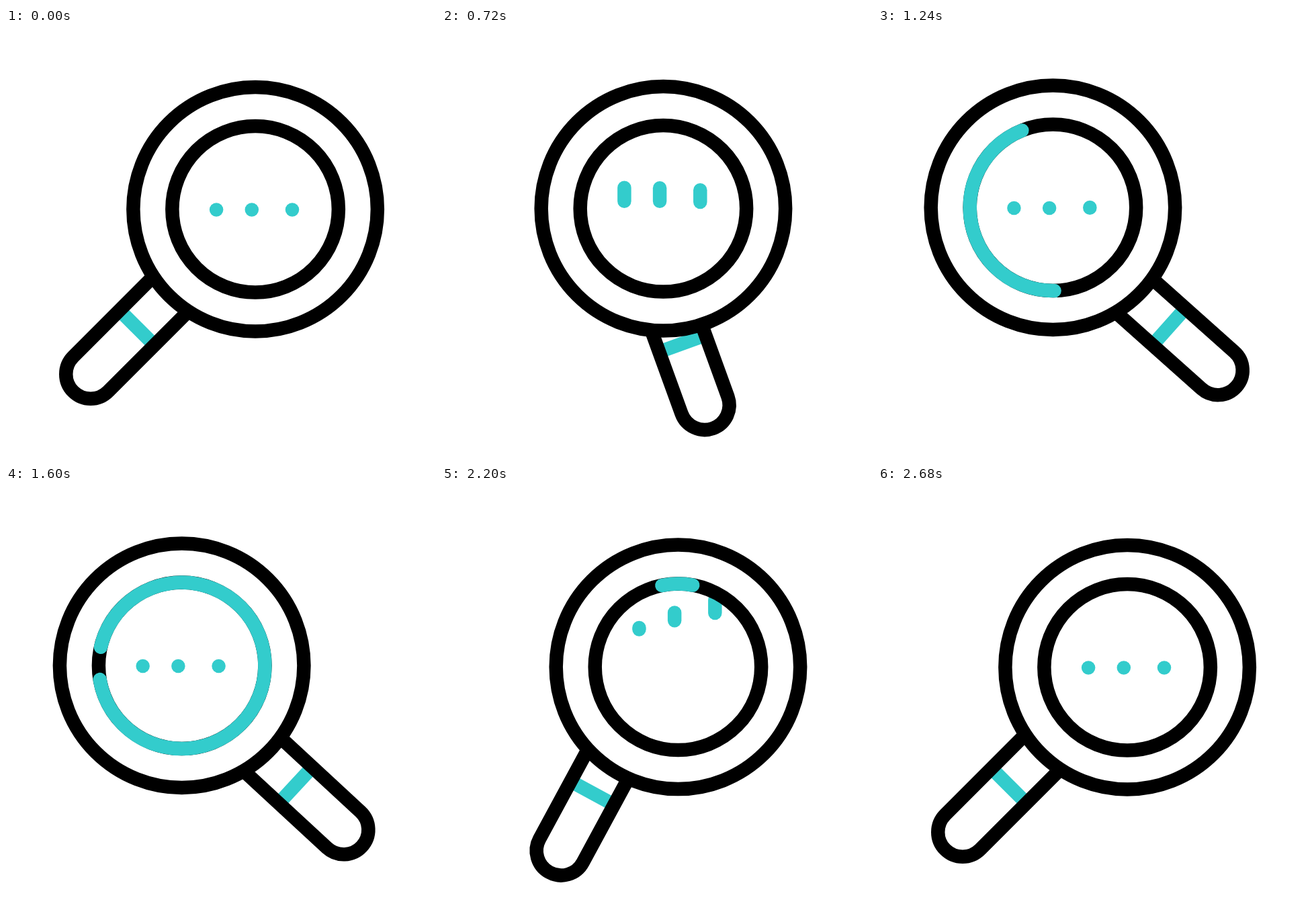
An HTML page with a canvas for the animation above (3 s loop, 640 px wide and 640 px high).

```html
<!DOCTYPE html>
<html lang="en">
<head>
<meta charset="utf-8">
<title>Magnifier</title>
<style>
  html, body { margin: 0; width: 100%; height: 100%; overflow: hidden; background: #fff; }
  canvas { display: block; width: 640px; height: 640px; }
</style>
</head>
<body>
<canvas id="stage" width="640" height="640"></canvas>
<script>
const ctx = document.getElementById('stage').getContext('2d');
const LOOP = 3000, BLACK = '#000', TEAL = '#33cccc', STROKE = 20.5;
const RIM = 181.75, GLASS = 123.75, GRIP = 36.7;
const rad = deg => deg * Math.PI / 180;
const mix = (a, b, f) => a + (b - a) * f;
const progress = (t, start, duration) => Math.min(1, Math.max(0, (t - start) / duration));
const smooth = x => x * x * (3 - 2 * x);
const easeOut = x => 1 - (1 - x) ** 2;

// Easing curve with control points (p, 0) and (q, 1).
function bezier(p, q) {
  return x => {
    let lo = 0, hi = 1;
    for (let i = 0; i < 24; i++) {
      const s = (lo + hi) / 2, r = 1 - s;
      if (3 * p * s * r * r + 3 * q * s * s * r + s ** 3 < x) lo = s; else hi = s;
    }
    return smooth(hi);
  };
}
const swing = bezier(.765, .235), turnOut = bezier(.558, .164);
const slideOut = bezier(.79, .053), slideBack = bezier(.838, .035);

function stroke(color, cap, trace) {
  ctx.strokeStyle = color;
  ctx.lineCap = cap;
  ctx.beginPath();
  trace();
  ctx.stroke();
}

function line(color, cap, x1, y1, x2, y2) {
  stroke(color, cap, () => { ctx.moveTo(x1, y1); ctx.lineTo(x2, y2); });
}

function ring(color, radius, from = 0, to = 360) {
  stroke(color, 'round', () => ctx.arc(0, 0, radius, rad(from), rad(to)));
}

function drawHandle(out, back) {
  const turn = turnOut(out) - swing(back);
  const shift = slideOut(out) - slideBack(back);
  const dip = back ? 0 : 39 * turn * (1 - turn);
  ctx.save();
  ctx.translate(mix(239.1, 386.6, shift), mix(402, 403, shift) + dip);
  ctx.rotate(rad(mix(135, 41.7, turn)));
  line(TEAL, 'butt', 62.4, -GRIP, 62.4, GRIP);
  stroke(BLACK, 'butt', () => {
    ctx.moveTo(-25, -GRIP);
    ctx.arc(160, 0, GRIP, -Math.PI / 2, Math.PI / 2);
    ctx.lineTo(-25, GRIP);
  });
  ctx.restore();
}

// Both ends of a dot's vertical streak.
function streak(t, k) {
  const rise = t - 86 * k, fall = t - 1694 - 80 * k;
  if (fall < 0) {
    const lift = swing(progress(rise, 240, 460)) - swing(progress(rise, 700, 460));
    return [-31.8 * lift, -11.9 * lift];
  }
  if (fall < 320) {
    const drop = smooth(fall / 400);
    return [170 * drop, 121 * drop];
  }
  if (fall < 560) {
    const left = 1 - smooth((fall - 320) / 240);
    return [-53 - 49 * left, -53 - 29 * left];
  }
  const y = -53 * (1 - smooth(progress(fall, 560, 240)));
  return [y, y];
}

function drawDots(t) {
  ctx.save();
  ctx.beginPath();
  ctx.arc(0, 0, GLASS, 0, 2 * Math.PI);
  ctx.clip();
  [-58, -5.3, 54.9].forEach((x, k) => {
    const [a, b] = streak(t, k);
    line(TEAL, 'round', x, a + .7, x, b + .71);
  });
  ctx.restore();
}

function drawSweep(t) {
  const head = smooth(progress(t, 811, 932));
  const tail = easeOut(progress(t, 1630, 755));
  if (head <= tail) return;
  const offset = -74.5 - ((2390 - t) * .0122) ** 2;
  ring(TEAL, GLASS, offset + 360 * tail, offset + 360 * head);
}

function draw(t) {
  const out = progress(t, 240, 1025), back = progress(t, 1440, 1240);
  const shift = swing(out) - swing(back);
  ctx.fillStyle = '#fff';
  ctx.fillRect(0, 0, 640, 640);
  ctx.lineWidth = STROKE;
  drawHandle(out, back);
  ctx.save();
  ctx.translate(mix(371.1, 260.4, shift), mix(269.8, 267.3, shift));
  ctx.beginPath();
  ctx.arc(0, 0, RIM, 0, 2 * Math.PI);
  ctx.fill();
  ring(BLACK, RIM);
  drawDots(t);
  ring(BLACK, GLASS);
  drawSweep(t);
  ctx.restore();
}

function tick() {
  draw(performance.now() % LOOP);
  requestAnimationFrame(tick);
}
tick();
</script>
</body>
</html>
```
